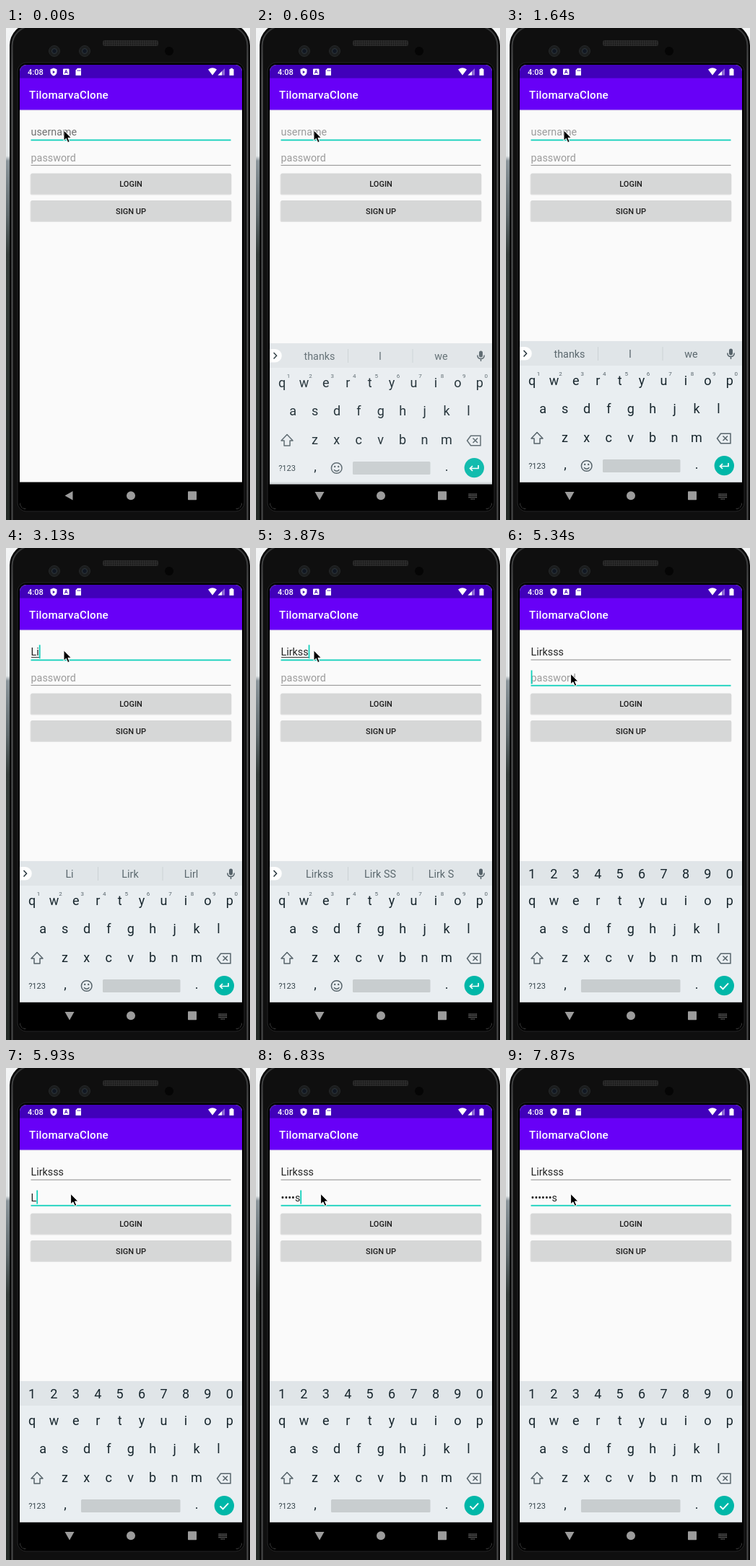
An HTML page that plays this animation: 338x682 px, repeating every 8000 ms.

```html
<!DOCTYPE html>
<html lang="en">
<head>
<meta charset="utf-8">
<title>Login screen</title>
<style>
html, body { margin: 0; width: 100%; height: 100%; overflow: hidden; background: #e9ecee; }
svg { display: block; width: 338px; height: 682px; font-family: Roboto, "Noto Sans", sans-serif; }
.mid { text-anchor: middle; }
.field { font-size: 14.3px; }
.btn { font-size: 11px; font-weight: 500; fill: #1d1d1d; text-anchor: middle; }
.key { font-size: 18px; fill: #17262d; text-anchor: middle; }
.sup { font-size: 8px; fill: #56636a; text-anchor: middle; }
.sug { font-size: 14.3px; fill: #5b686e; text-anchor: middle; }
.line { fill: none; stroke: #56636a; stroke-width: 1.5; }
</style>
</head>
<body>
<svg viewBox="0 0 338 682">
  <defs>
    <linearGradient id="scene" x2="0" y2="1">
      <stop offset="0" stop-color="#f4f5f6"/>
      <stop offset=".26" stop-color="#e2e6e8"/>
      <stop offset=".27" stop-color="#8b959b"/>
      <stop offset=".38" stop-color="#5f696c"/>
      <stop offset=".46" stop-color="#343c39"/>
      <stop offset="1" stop-color="#232a26"/>
    </linearGradient>
    <linearGradient id="rim" x2="0" y2="1">
      <stop offset="0" stop-color="#333435"/>
      <stop offset=".1" stop-color="#565758"/>
      <stop offset="1" stop-color="#474849"/>
    </linearGradient>
    <pattern id="mesh" width="3" height="3" patternUnits="userSpaceOnUse">
      <rect width="3" height="3" fill="#2c2c2c"/>
      <circle cx="1.5" cy="1.5" r=".9" fill="#151515"/>
    </pattern>
    <clipPath id="screen"><rect x="19" y="51" width="308" height="616" rx="9"/></clipPath>
  </defs>

  <rect width="338" height="682" fill="#f6f7f7"/>
  <rect width="12" height="682" fill="url(#scene)"/>
  <rect x="5" y="-6" width="333" height="730" rx="30" fill="#090909"/>
  <rect x="8.500" y="-2.500" width="326" height="725" rx="27" fill="#0f0f0f" stroke="url(#rim)" stroke-width="2"/>
  <rect x="16" y="48" width="314" height="622" rx="12" fill="#000" stroke="#242526"/>
  <rect x="134" y="17" width="77" height="8" rx="3" fill="url(#mesh)"/>
  <g fill="#1b1d1e" stroke="#262829">
    <circle cx="67" cy="32" r="7.5"/><circle cx="109" cy="32" r="7.5"/>
  </g>
  <g fill="#111722" stroke="#30383c">
    <circle cx="67" cy="32" r="3.5"/><circle cx="109" cy="32" r="3.5"/>
  </g>
  <circle cx="226" cy="32" r="6" fill="#050505"/>

  <g clip-path="url(#screen)">
    <rect x="19" y="51" width="308" height="616" fill="#fafafa"/>
    <rect x="19" y="113" width="308" height="1.500" fill="#e6e6e6"/>
    <rect x="19" y="51" width="308" height="19" fill="#4100ba"/>
    <rect x="19" y="69.5" width="308" height="44" fill="#6800f7"/>
    <g fill="#fff">
      <text x="30" y="65" font-size="11" font-weight="500">4:08</text>
      <path d="M66 55.5l4.5 1.7v3.3q0 4-4.5 6-4.5-2-4.5-6v-3.3z"/>
      <rect x="79" y="56.5" width="8.5" height="8.5" rx="1"/>
      <path d="M99 55.8h5v10h-7.5v-7.4z"/>
      <path d="M280 57.5q6-4.6 12 0l-6 8z"/>
      <path d="M303 56v9.5h-9.5z" opacity=".4"/>
      <path d="M299 60v5.5h-5.5z"/>
      <path d="M309.5 57h1.5v-1.2h3V57h1.5v8.8h-6z"/>
      <text x="32" y="98" font-size="15.2" font-weight="500" letter-spacing=".19">TilomarvaClone</text>
    </g>
    <path d="M64.8 59v4.200l3.200-2.100z" fill="#4100ba"/>
    <path d="M81.300 63.200l2-5 2 5m-3.300-1.600h2.600" fill="none" stroke="#4100ba"/>
    <path d="M99.500 58v2m1.600-2v2m1.600-2v2" stroke="#4100ba" stroke-width=".7"/>

    <text id="user" class="field" x="34.600" y="149.300"></text>
    <rect id="under" x="35" y="151" height="1" fill="#333"/>
    <rect id="userLine" x="34.500" width="277"/>
    <text id="pass" class="field" x="34.600" y="184.500"></text>
    <rect id="passLine" x="34.500" width="277"/>
    <rect id="caret" width="1.800" height="19" fill="#10d0bb"/>

    <g id="buttons"></g>

    <rect x="19" y="629.500" width="308" height="38" fill="#000"/>
    <g fill="#9c9c9c">
      <path id="back" d="M81.500 648.300l11-6.300v12.600z"/>
      <path id="down" d="M81.500 643h13l-6.500 11.500z"/>
      <circle cx="173" cy="648.300" r="6"/>
      <rect x="252" y="642.300" width="12" height="12" rx=".8"/>
      <path id="imeIcon" d="M294.500 646.200h11.500m-11.500 2.200h11.500m-11.500 2.200h11.500m-8.500 2.400h5.500"
        stroke="#858585" stroke-dasharray="1.400 .7" stroke-width="1.200"/>
    </g>

    <g id="board">
      <rect x="19" y="434" width="308" height="195.500" fill="#e9eef1"/>
      <rect x="19" y="434" width="308" height="34" fill="#e0e5e8"/>
      <g id="letters"></g>
      <path class="line" d="M43 560.500l-8 8.500h4v7h8v-7h4z" stroke-linejoin="round"/>
      <path class="line" d="M292.500 569l5-6.800h13.500v13.600h-13.500zM300.500 565.500l6.500 6.500m0-6.500l-6.500 6.500"/>
      <text class="mid" x="43" y="611" font-size="11" fill="#34434a">?123</text>
      <text class="key" x="82" y="611" font-size="16">,</text>
      <text class="key" x="264" y="611">.</text>
      <rect id="space" y="598" height="18" rx="1.500" fill="#c8cdcf"/>
      <circle cx="302.300" cy="606.600" r="13.700" fill="#00b7a8"/>

      <g id="wordMode">
        <g id="sups"></g>
        <path d="M19 442h7.500a9 9 0 0 1 0 18.500H19z" fill="#fff"/>
        <path d="M24.500 447l4 4.200-4 4.200" fill="none" stroke="#25343b" stroke-width="1.500"/>
        <path d="M127.500 442v19M217 442v19" stroke="#ccd2d5"/>
        <text class="sug" x="88" y="457"></text>
        <text class="sug" x="172" y="457"></text>
        <text class="sug" x="256.500" y="457"></text>
        <rect x="309" y="444.500" width="5" height="9" rx="2.500" fill="#56636a"/>
        <path class="line" d="M306.800 450.500q0 5 4.700 5t4.700-5M311.500 455.500v3.500" stroke-width="1.200"/>
        <circle class="line" cx="111.700" cy="607" r="7.300" stroke-width="1.300"/>
        <path class="line" d="M108 609.200q3.700 4 7.400 0" stroke-width="1.300"/>
        <g fill="#56636a"><circle cx="109.200" cy="605" r="1.200"/><circle cx="114.200" cy="605" r="1.200"/></g>
        <path d="M308 603v4.500h-11.500m3.500-3.500l-3.500 3.500 3.500 3.500" fill="none" stroke="#fff" stroke-width="1.700"/>
      </g>
      <g id="passMode">
        <g id="digits"></g>
        <path d="M296.500 607.300l4 4 7.500-8" fill="none" stroke="#fff" stroke-width="1.900"/>
      </g>
    </g>
  </g>

  <path id="mouse" d="M0 0V14.500L3.300 11.500 5.700 17 8.200 15.900 5.900 10.600H10.400Z" fill="#000" stroke="#fff" stroke-width="1"/>
</svg>
<script>
const LOOP = 8000;
const $ = id => document.getElementById(id);
const show = (el, on) => el.setAttribute('display', on ? 'inline' : 'none');
const set = (el, attrs) => { for (const k in attrs) el.setAttribute(k, attrs[k]); };
// latest value in a list of [time, value]
const at = (steps, t) => steps.reduce((v, s) => t >= s[0] ? s[1] : v, steps[0][1]);
const between = (t, a, b) => t >= a && t < b;

const row = (chars, x, y, cls) => [...chars].map((c, i) =>
  `<text class="${cls}" x="${x + i * 30.42}" y="${y}">${c}</text>`).join('');
$('letters').innerHTML = row('qwertyuiop', 36, 495, 'key') +
  row('asdfghjkl', 51.2, 534, 'key') + row('zxcvbnm', 81.4, 574, 'key');
$('sups').innerHTML = row('1234567890', 45, 482, 'sup');
$('digits').innerHTML = row('1234567890', 36, 458, 'key');
$('buttons').innerHTML = [['LOGIN', 201.5], ['SIGN UP', 239]].map(([s, y]) =>
  `<rect x="33.500" y="${y + .8}" width="279" height="29.300" rx="2" fill="#e2e2e2"/>
   <rect x="34.500" y="${y}" width="277.500" height="28.800" rx="1.500" fill="#d6d7d7"/>
   <text class="btn" x="173" y="${y + 18.5}">${s}</text>`).join('');

const keys = [...$('letters').children];
const words = [...document.querySelectorAll('.sug')];
const name = 'Lirksss';
const userLen = [[0, 0], [2680, 1], [3130, 2], [3270, 3], [3420, 4], [3720, 5], [3870, 6], [4010, 7]];
const passLen = [[0, 0], [5780, 1], [6230, 2], [6380, 3], [6530, 4], [6830, 5], [6980, 6], [7420, 7]];
const hints = [
  [0, 'thanks I we'], [2830, 'L Li Lo'], [3130, 'Li Lirk Lirl'], [3270, 'Lir Lirk Lirl'],
  [3420, 'Lirk Lirl Lirks'], [3720, 'Lirks Lirk_S Lirk'], [3870, 'Lirkss Lirk_SS Lirk_S'],
  [4010, 'Lirksss Lirk_SSS Lirk_SS']
];
const caretOn = [[0, 0], [150, 1], [600, 0], [1190, 1], [1640, 0], [2090, 1], [4460, 0], [5050, 1], [7870, 0]];
const mousePos = [[0, [80, 141.7]], [4610, [82, 151]], [4750, [88, 168]], [4900, [89.6, 174.3]]];
const boardDrop = [[0, 0], [450, 40], [600, 3], [740, 0]];
const boardAlpha = [[0, 0], [450, .5], [600, .92], [740, 1]];

function fieldText(el, text, hint, color) {
  el.textContent = text || hint;
  el.setAttribute('fill', text ? '#222' : color);
  return text ? el.getComputedTextLength() : 0;
}

function underline(el, y, active) {
  set(el, active ? { y, height: 1.8, fill: '#10d0bb' } : { y, height: 1, fill: '#8b8b8b' });
}

function draw(t) {
  const inPass = t >= 5050, passKeys = t >= 5190;
  const u = name.slice(0, at(userLen, t));
  const n = at(passLen, t);
  const p = n ? '•'.repeat(n - 1) + name[n - 1] : '';
  const uw = fieldText($('user'), u, 'username', t < 150 ? '#707070' : '#9b9b9b');
  const pw = fieldText($('pass'), p, 'password', '#9b9b9b');

  set($('under'), { width: uw });
  show($('under'), u && !inPass);
  underline($('userLine'), 154.5, !inPass);
  underline($('passLine'), 189.8, inPass);
  set($('caret'), { x: 34.6 + (inPass ? pw : uw), y: inPass ? 169.5 : 134.3 });
  show($('caret'), at(caretOn, t));

  const open = t >= 450;
  show($('back'), !open);
  show($('down'), open);
  show($('imeIcon'), open);
  show($('board'), open);
  set($('board'), { transform: `translate(0 ${at(boardDrop, t)})`, opacity: at(boardAlpha, t) });
  show($('wordMode'), !passKeys);
  show($('passMode'), passKeys);
  set($('space'), passKeys ? { x: 104, width: 137.5 } : { x: 134, width: 107.5 });
  at(hints, t).split(' ').forEach((w, i) => words[i].textContent = w.replace('_', ' '));

  const caps = between(t, 5630, 5930);
  for (const k of keys) {
    k.textContent = caps ? k.textContent.toUpperCase() : k.textContent.toLowerCase();
  }
  set($('mouse'), { transform: `translate(${at(mousePos, t)})` });
}

const start = performance.now();
function tick() {
  draw((performance.now() - start) % LOOP);
  requestAnimationFrame(tick);
}
tick();
</script>
</body>
</html>
```
